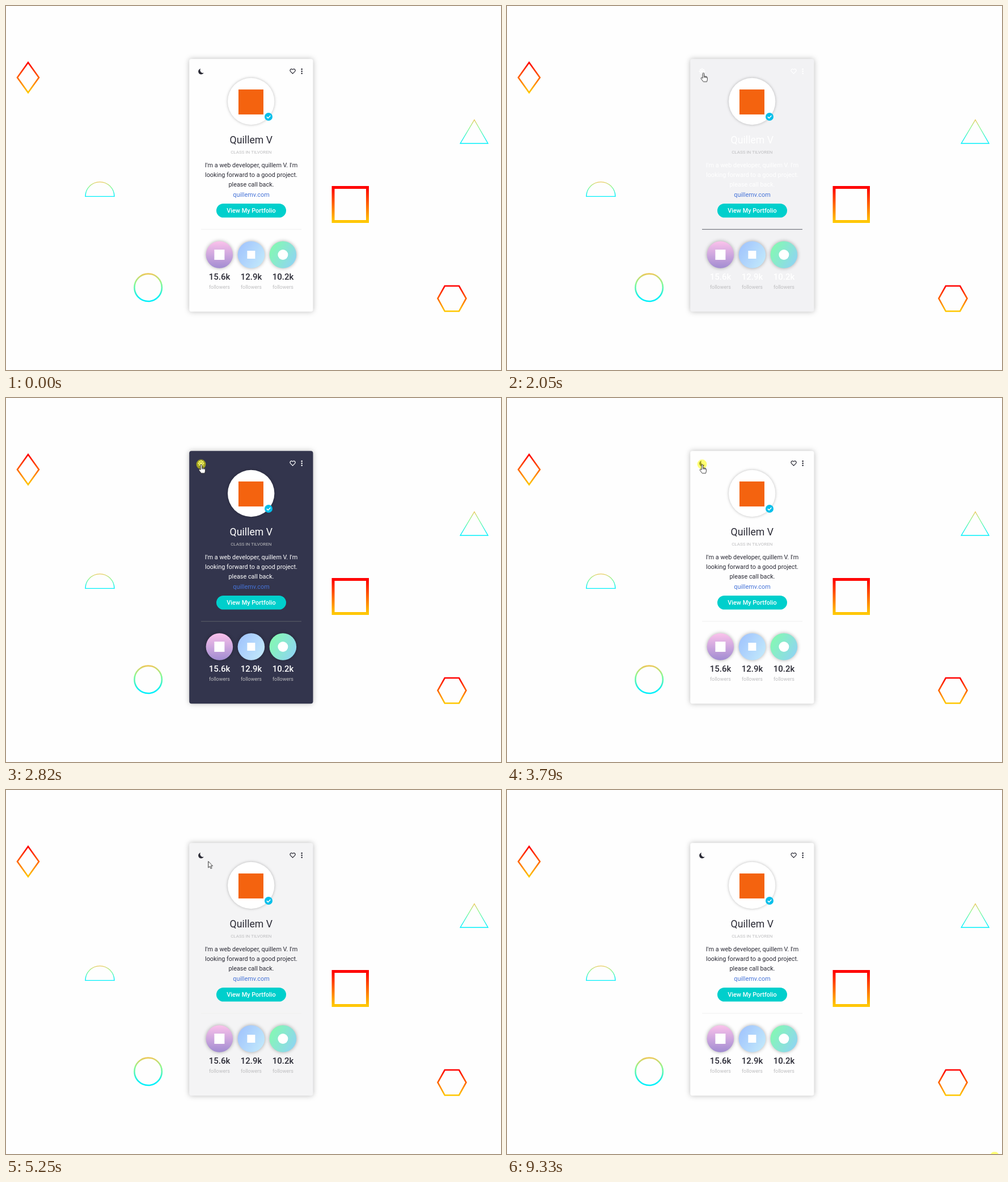
Recreate the animation shown at these times as an HTML page. Size 873x641 px, loop 9430 ms.

```html
<!DOCTYPE html>
<html lang="en">
<head>
<meta charset="utf-8">
<title>Profile card</title>
<style>
html, body { margin: 0; width: 100%; height: 100%; overflow: hidden; background: #fefefe; }
svg { display: block; width: 873px; height: 641px; font-family: Roboto, sans-serif; }
text { text-anchor: middle; fill: currentColor; }

.shapes { fill: none; stroke-width: 2.6; }
.warm { stroke: url(#warm); }
.cool { stroke: url(#cool); }

.card { animation: card 9.43s infinite; filter: drop-shadow(0 0 5px #0004); }
.theme { animation: theme 9.43s step-end infinite; }
.moon { animation: moon 9.43s step-end infinite; }
.sun { animation: sun 9.43s step-end infinite; }
.rule { stroke: var(--line); }
.avatar { fill: #fff; filter: drop-shadow(0 0 2.5px #0004); }
.social { filter: drop-shadow(0 0 3px #0005); }
.name { font-size: 17.7px; }
.muted { fill: #bdbdbf; }
.role { font-size: 8px; }
.bio { font-size: 10.88px; }
.link { fill: #4573d8; }
.button { fill: #fff; font-weight: 500; }
.count { font-size: 15px; font-weight: 500; }
.unit { font-size: 9px; }

.x { animation: x 9.43s infinite; }
.y { animation: y 9.43s infinite; }
.arrow { animation: arrow 9.43s step-end infinite; }
.hand { animation: hand 9.43s step-end infinite; }
.press { fill: #ff0; animation: press 9.43s step-end infinite; }
.pointer { fill: #fff; stroke: #222; stroke-width: .9; stroke-linejoin: round; }

@keyframes card {
  0%, 21.36%, 37.33%, 41.89%, 57.16%, 100% { fill: #fefefe; animation-timing-function: ease; }
  26.66%, 32.03%, 47.19%, 51.86% { fill: #33354d; animation-timing-function: ease; }
}
@keyframes theme {
  0%, 32.03%, 51.86%, 100% { color: #2a2a35; --line: #f0f0f1; }
  21.36%, 41.89% { color: #fff; --line: #5c5e68; }
}
@keyframes moon {
  0%, 32.03%, 51.86%, 100% { opacity: 1; }
  21.36%, 41.89% { opacity: 0; }
}
@keyframes sun {
  0%, 32.03%, 51.86%, 100% { opacity: 0; }
  21.36%, 41.89% { opacity: 1; }
}
@keyframes x {
  0%, 6.57% { translate: 254px; animation-timing-function: ease-in-out; }
  12.2% { translate: 392px; animation-timing-function: ease-in-out; }
  16.54% { translate: 348px; }
  21.5% { translate: 346px; }
  29.8%, 53.02% { translate: 344px; animation-timing-function: ease-in; }
  55.67% { translate: 356px; animation-timing-function: cubic-bezier(.3, .2, .6, .9); }
  60.13% { translate: 488px; animation-timing-function: ease-out; }
  65.85%, 87.17% { translate: 503.7px; animation-timing-function: cubic-bezier(.4, 0, .7, .9); }
  93.74% { translate: 807px; }
  98.9%, 100% { translate: 860px; }
}
@keyframes y {
  0%, 6.56% { translate: 0 665px; animation-timing-function: step-end; }
  6.57% { translate: 0 638px; animation-timing-function: ease-in-out; }
  16.54% { translate: 0 120px; }
  21.5% { translate: 0 117.5px; }
  29.8%, 53.02% { translate: 0 116.7px; animation-timing-function: ease-in; }
  55.67% { translate: 0 125px; }
  60.13% { translate: 0 126px; animation-timing-function: ease-out; }
  65.85%, 87.17% { translate: 0 114.7px; animation-timing-function: ease-in; }
  93.74% { translate: 0 642px; }
  98.9%, 100% { translate: 0 645.5px; }
}
@keyframes arrow {
  0%, 54.6%, 88.6%, 100% { opacity: 1; }
  16.74%, 62.5% { opacity: 0; }
}
@keyframes hand {
  0%, 54.6%, 88.6%, 100% { opacity: 0; }
  16.74%, 62.5% { opacity: 1; }
}
@keyframes press {
  0%, 20.68%, 30.96%, 41.35%, 51.21%, 73.05%, 80.48%, 100% { opacity: 0; }
  18.23%, 29.89%, 40.18%, 50.15%, 71.89%, 79.42%, 98.93% { opacity: .55; }
}
</style>
</head>
<body>
<svg viewBox="0 0 873 641">
  <defs>
    <linearGradient id="warm" x2="0" y2="1">
      <stop stop-color="#f00"/><stop offset="1" stop-color="#ffc800"/>
    </linearGradient>
    <linearGradient id="cool" x2="0" y2="1">
      <stop stop-color="#ecca5c"/><stop offset=".35" stop-color="#8cf992"/><stop offset=".9" stop-color="#00f0fa"/>
    </linearGradient>
    <linearGradient id="pink" x2="0" y2="1">
      <stop stop-color="#fbc2eb"/><stop offset="1" stop-color="#a18cd1"/>
    </linearGradient>
    <linearGradient id="blue" y1=".2" y2=".8">
      <stop stop-color="#a1c4fd"/><stop offset="1" stop-color="#c2e9fb"/>
    </linearGradient>
    <linearGradient id="green" y1=".2" y2=".8">
      <stop stop-color="#84fab0"/><stop offset="1" stop-color="#8fd3f4"/>
    </linearGradient>
  </defs>

  <g class="shapes">
    <path class="warm" d="M39 99.5 58 126 39 152.5 20 126Z"/>
    <rect class="warm" x="577" y="319.5" width="60.5" height="60" stroke-width="5"/>
    <path class="warm" d="M761.5 515 773.8 493H799L811.5 515 799 537.5H773.8Z"/>
    <path class="cool" d="M826 200.5 850 242H801.2Z" stroke-width="1.4"/>
    <circle class="cool" cx="250.7" cy="495.8" r="24.2"/>
    <path class="cool" d="M140 335.4A25.5 25.5 0 0 1 191 335.4Z" stroke-width="1.4"/>
  </g>

  <rect class="card" x="323.2" y="93.2" width="218.3" height="445" rx="4"/>

  <g class="theme">
    <path class="moon" fill="currentColor" d="M343.2 110.3a5.1 5.1 0 1 0 5.6 7.3 4.9 4.9 0 0 1-5.6-7.3Z"/>
    <g class="sun" transform="translate(344 115)" fill="currentColor">
      <path fill-rule="evenodd" d="M0-6 1.5-3.6 4.2-4.2 3.6-1.5 6 0 3.6 1.5 4.2 4.2 1.5 3.6 0 6-1.5 3.6-4.2 4.2-3.6 1.5-6 0-3.6-1.5-4.2-4.2-1.5-3.6ZM-2.9 0a2.9 2.9 0 0 0 5.8 0 2.9 2.9 0 0 0-5.8 0Z"/>
      <circle r="2.1"/>
    </g>
    <path fill="none" stroke="currentColor" stroke-width="1.2" stroke-linejoin="round" d="M505.6 119.2 501.8 115.3C499.6 112.8 503.2 108.9 505.6 112 508 108.9 511.6 112.8 509.4 115.3Z"/>
    <g fill="currentColor">
      <circle cx="521.7" cy="111.2" r="1.25"/><circle cx="521.7" cy="115" r="1.25"/><circle cx="521.7" cy="118.8" r="1.25"/>
    </g>

    <circle class="avatar" cx="432.2" cy="168" r="41.2"/>
    <rect x="410" y="147" width="44" height="44" fill="#f4630f"/>
    <circle cx="463" cy="195" r="7" fill="#04bfea"/>
    <path d="M459.8 195.1 462.2 197.4 466.4 193" fill="none" stroke="#fff" stroke-width="1.5"/>

    <text class="name" x="432.3" y="242.2">Quillem V</text>
    <text class="role muted" x="432.3" y="259.8">CLASS IN TILVOREN</text>
    <g class="bio">
      <text x="432.5" y="283.6">I'm a web developer, quillem V. I'm</text>
      <text x="432.5" y="301">looking forward to a good project.</text>
      <text x="432.5" y="318.4">please call back.</text>
      <text class="link" x="432.5" y="336">quillemv.com</text>
      <rect x="371" y="348" width="123" height="24.6" rx="12.3" fill="#00cfcc"/>
      <text class="button" x="432.5" y="363.5">View My Portfolio</text>
    </g>
    <path class="rule" d="M344 393.3H521"/>

    <g class="social">
      <circle cx="376.4" cy="438" r="23.8" fill="url(#pink)"/>
      <circle cx="432.4" cy="438" r="23.8" fill="url(#blue)"/>
      <circle cx="488.4" cy="438" r="23.8" fill="url(#green)"/>
    </g>
    <g fill="#fff">
      <rect x="367.4" y="429" width="18" height="18"/>
      <rect x="425.4" y="431" width="14" height="14"/>
      <circle cx="488.4" cy="438" r="9"/>
    </g>
    <g class="count">
      <text x="376.5" y="482.4">15.6k</text><text x="432.5" y="482.4">12.9k</text><text x="488.5" y="482.4">10.2k</text>
    </g>
    <g class="unit">
      <text class="muted" x="376.5" y="497.6">followers</text><text class="muted" x="432.5" y="497.6">followers</text><text class="muted" x="488.5" y="497.6">followers</text>
    </g>
  </g>

  <g class="x"><g class="y">
    <circle class="press" r="8.4"/>
    <g class="pointer">
      <path class="arrow" d="M.5.6V11.8L3 9.4 4.9 13.4 6.7 12.6 4.9 8.7H8.2Z"/>
      <g class="hand">
        <path d="M-.9 9.8V1.8a1.3 1.3 0 0 1 2.6 0V6.2L5.6 6.9Q7.4 7.3 7.4 9V11.6Q7.4 13.6 6.3 15.8H.4L-3.7 10.6Q-4.2 9-3 8.6-1.9 8.4-.9 9.8Z"/>
        <path d="M1.7 6.2V8.8M3.6 6.6V9M5.5 6.9V9.2" fill="none"/>
      </g>
    </g>
  </g></g>
</svg>
</body>
</html>
```
